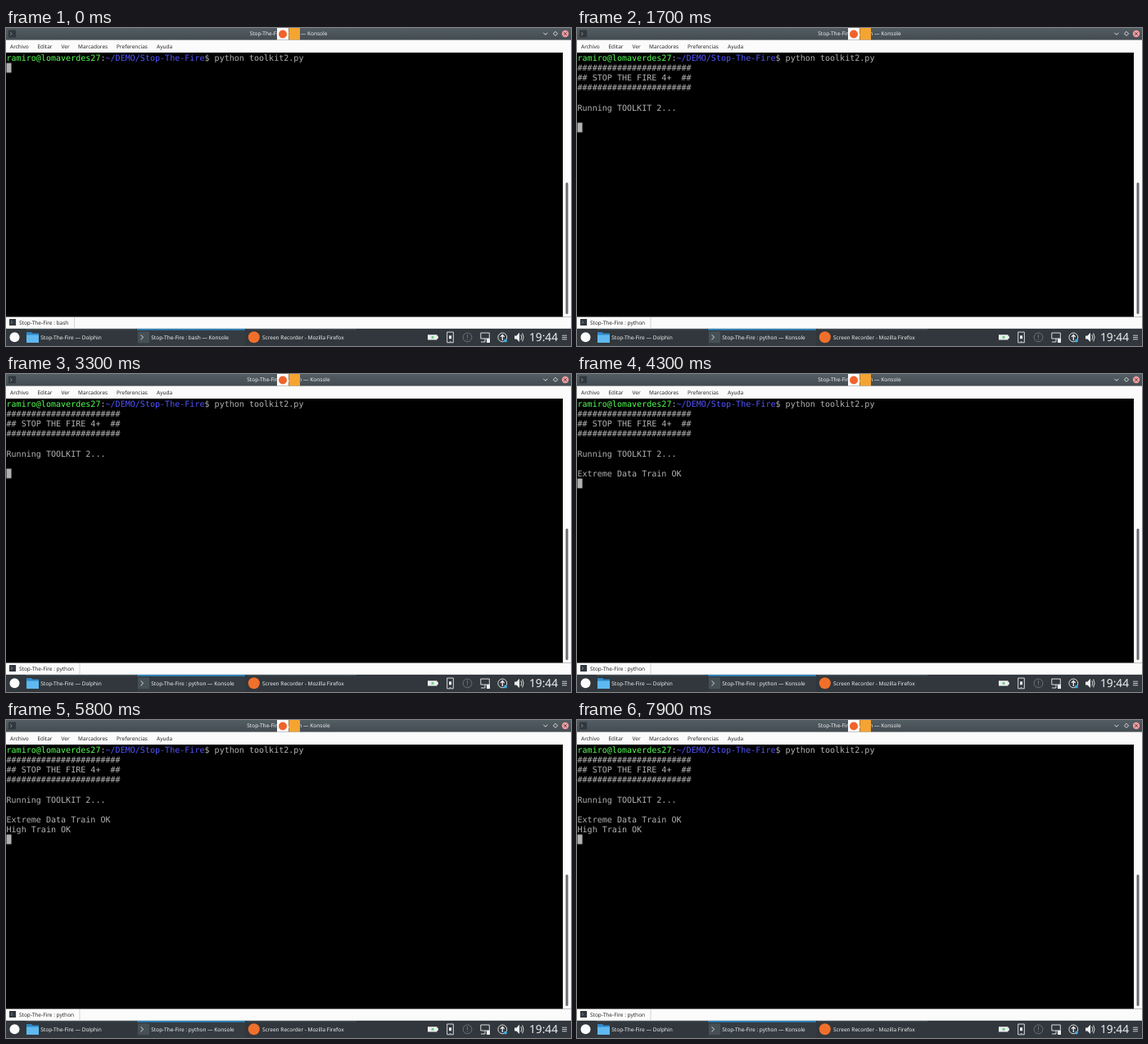
An HTML page that plays this animation: 690x388 px, repeating every 8000 ms.

```html
<!DOCTYPE html>
<html lang="es">
<head>
<meta charset="utf-8">
<title>Konsole</title>
<style>
html, body { margin: 0; width: 100%; height: 100%; overflow: hidden; background: #000; }
svg { display: block; width: 690px; height: 388px; }
text { font: 6.53px "Noto Sans", sans-serif; text-rendering: geometricPrecision; white-space: pre; }
.term text { font: 10.066px "DejaVu Sans Mono", monospace; fill: #b2b2b2; }
.term .user { fill: #54ff54; }
.term .path { fill: #5454ff; }
.light text { fill: #eff0f1; }
.dark text { fill: #26292c; }
.line { fill: none; stroke: #eff0f1; stroke-width: .9; }

.bash, .python, .banner, .extreme, .high, .cursor { animation: 8s step-end infinite; }
.bash { animation-name: bash; }
.python { animation-name: python; }
.banner { animation-name: banner; }
.extreme { animation-name: extreme; }
.high { animation-name: high; }
.cursor { animation-name: cursor; }
@keyframes bash { 0% { visibility: visible } 14.75%, 100% { visibility: hidden } }
@keyframes python { 0% { visibility: hidden } 14.75%, 100% { visibility: visible } }
@keyframes banner { 0% { visibility: hidden } 21%, 100% { visibility: visible } }
@keyframes extreme { 0% { visibility: hidden } 53.5%, 100% { visibility: visible } }
@keyframes high { 0% { visibility: hidden } 72.25%, 100% { visibility: visible } }
@keyframes cursor {
  0% { transform: translateY(12.12px) }
  21% { transform: translateY(84.84px) }
  53.5% { transform: translateY(96.96px) }
  72.25%, 100% { transform: translateY(109.08px) }
}
</style>
</head>
<body>
<svg viewBox="0 0 690 388">
  <defs>
    <linearGradient id="bar" x2="0" y2="1">
      <stop stop-color="#535d64"/><stop offset="1" stop-color="#434c52"/>
    </linearGradient>
    <g id="shell">
      <rect width="14" height="14" rx="1" fill="currentColor"/>
      <path d="M3.5 4l3 3-3 3" fill="none" stroke="#aab0b3" stroke-width="1.1"/>
    </g>
  </defs>

  <!-- title bar -->
  <rect width="690" height="14.5" fill="url(#bar)"/>
  <use href="#shell" color="#31383d" transform="translate(3 2.5) scale(.65)"/>
  <g class="light" text-anchor="middle">
    <text class="bash" x="345" y="9.4">Stop-The-Fire : bash — Konsole</text>
    <text class="python" x="345" y="9.4">Stop-The-Fire : python — Konsole</text>
  </g>
  <rect x="331" width="14" height="14.5" fill="#fcfcfc"/>
  <circle cx="338" cy="7.5" r="5" fill="#f0632b"/>
  <rect x="345.5" width="13.5" height="14.5" fill="#f5a432"/>
  <path class="line" d="M656.3 5.8l2.5 2.5 2.5-2.5M671 4.3l2.6 2.6-2.6 2.6-2.6-2.6z"/>
  <circle cx="683" cy="7" r="4.2" fill="#f29a9c"/>
  <path d="M681.2 5.2l3.6 3.6m0-3.6l-3.6 3.6" stroke="#3b3f43" stroke-width=".8"/>

  <!-- menu -->
  <rect y="14.5" width="690" height="15.5" fill="#fbfbfb"/>
  <g class="dark">
    <text x="5" y="24.5">Archivo</text>
    <text x="38.5" y="24.5">Editar</text>
    <text x="67.5" y="24.5">Ver</text>
    <text x="88" y="24.5">Marcadores</text>
    <text x="135" y="24.5">Preferencias</text>
    <text x="184" y="24.5">Ayuda</text>
  </g>

  <!-- terminal -->
  <rect y="30" width="680" height="322.5" fill="#000"/>
  <rect x="680" y="30" width="10" height="322.5" fill="#fbfbfb"/>
  <rect x="683.5" y="188.5" width="3" height="160.5" rx="1.5" fill="#686c70"/>
  <g class="term">
    <text x=".5" y="40"><tspan class="user">ramiro@lomaverdes27</tspan>:<tspan class="path">~/DEMO/Stop-The-Fire</tspan>$ python toolkit2.py</text>
    <g class="banner">
      <text x=".5" y="52.12">#######################</text>
      <text x=".5" y="64.24">## STOP THE FIRE 4+  ##</text>
      <text x=".5" y="76.36">#######################</text>
      <text x=".5" y="100.6">Running TOOLKIT 2...</text>
    </g>
    <text class="extreme" x=".5" y="124.84">Extreme Data Train OK</text>
    <text class="high" x=".5" y="136.96">High Train OK</text>
    <rect class="cursor" x=".5" y="30.6" width="6.06" height="11.8" fill="#b2b2b2"/>
  </g>

  <!-- tabs -->
  <rect y="352.5" width="690" height="14.5" fill="#fbfbfb"/>
  <use href="#shell" color="#31383d" transform="translate(4 355) scale(.58)"/>
  <g class="dark">
    <g class="bash">
      <text x="16" y="361.8">Stop-The-Fire : bash</text>
      <path d="M83.5 353v13" stroke="#c9cbcc" stroke-width=".8"/>
    </g>
    <g class="python">
      <text x="16" y="361.8">Stop-The-Fire : python</text>
      <path d="M90 353v13" stroke="#c9cbcc" stroke-width=".8"/>
    </g>
  </g>

  <!-- task bar -->
  <rect y="366.8" width="690" height="21.2" fill="#31373c"/>
  <rect x="24" y="367" width="135" height="1.3" fill="#445158"/>
  <rect x="160" y="367" width="132" height="21" fill="#343c42"/>
  <rect x="160" y="367" width="132" height="1.7" fill="#2d86c4"/>
  <rect x="294" y="367" width="134" height="1.3" fill="#445158"/>
  <circle cx="10.5" cy="377.3" r="6" fill="#fcfcfc"/>
  <path d="M25 371h6l1.5 1.5H40V384H25z" fill="#2f87c8"/>
  <path d="M25 374.5h15V384H25z" fill="#5fb9f0"/>
  <use href="#shell" color="#465055" x="161" y="370.3"/>
  <circle cx="302.8" cy="377.3" r="7" fill="#f0702b"/>
  <g class="light">
    <text x="42.3" y="379.8">Stop-The-Fire — Dolphin</text>
    <text class="bash" x="177.3" y="379.8">Stop-The-Fire : bash — Konsole</text>
    <text class="python" x="177.3" y="379.8">Stop-The-Fire : python — Konsole</text>
    <text x="313" y="379.8">Screen Recorder - Mozilla Firefox</text>
    <text x="639" y="382.4" style="font-size:13.7px">19:44</text>
  </g>

  <!-- tray -->
  <path d="M515 374.2h11.5v1.6h1.3v3.2h-1.3v1.6H515z" fill="#eff0f1"/>
  <path d="M519.5 376h3v2.8h-3z" fill="#6bcf7b"/>
  <g class="line">
    <path d="M538.7 371h7.6v12.8h-7.6z"/>
    <path d="M579.8 372h10.5v7h-10.5zM580 383h5M585 379v4"/>
    <circle cx="606.3" cy="377.4" r="5.4"/>
    <path d="M606.3 381v-6.5m-2.4 2.4l2.4-2.4 2.4 2.4" stroke-width="1.3"/>
    <path d="M628.8 374.2q2 3.2 0 6.4M630.6 372.4q3 5 0 10"/>
    <path d="M679 375.2h6M679 377.5h6M679 379.8h6" stroke-width=".8"/>
  </g>
  <path d="M541 375.3h3v4h-3zM541.8 382h1.5v.8h-1.5z" fill="#eff0f1"/>
  <g fill="none" stroke="#737a7f" stroke-width=".9">
    <circle cx="563.5" cy="377.4" r="5.4"/>
    <path d="M563.5 374v4.3m0 1.2v1.2"/>
  </g>
  <path d="M587 379h4v5h-4z" fill="#eff0f1"/>
  <circle cx="610" cy="381.5" r="1.9" fill="#3daee9"/>
  <path d="M621 375.4h2.4l3.6-3.6v11.2l-3.6-3.6H621z" fill="#eff0f1"/>
</svg>
</body>
</html>
```
